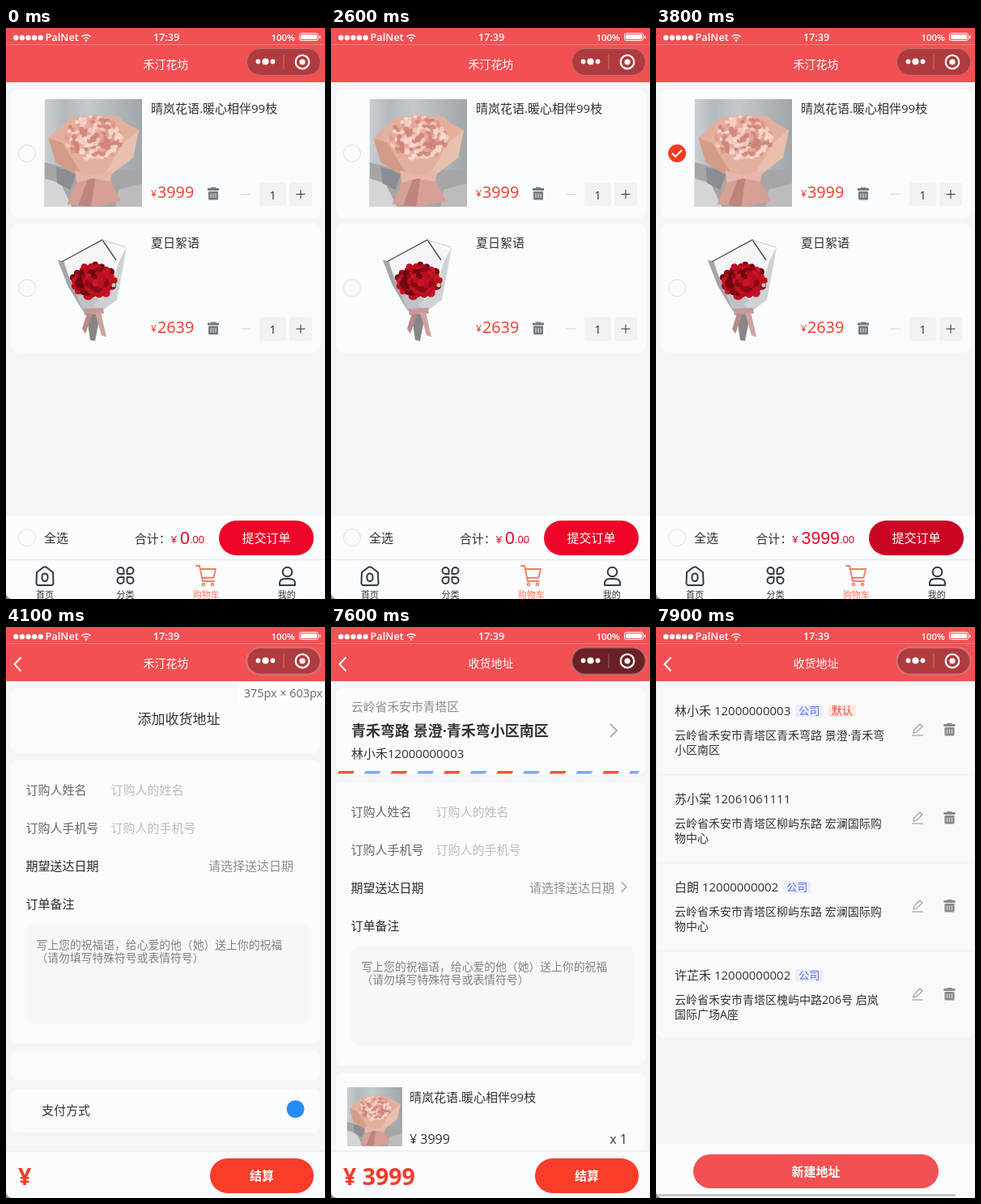
Recreate the animation shown at these times as an HTML page with a canvas. Size 394 by 706 pixels, loop 8 s.

```html
<!DOCTYPE html>
<html lang="zh">
<head>
<meta charset="utf-8">
<title>花坊购物车</title>
<style>
html, body { margin: 0; width: 100%; height: 100%; overflow: hidden; background: #f3f5f7; }
canvas { display: block; width: 394px; height: 706px; }
</style>
</head>
<body>
<canvas id="stage"></canvas>
<script>
const W = 394, H = 706, LOOP = 8000, STEP = 100;
const canvas = document.getElementById('stage');
const c = canvas.getContext('2d');
const dpr = window.devicePixelRatio || 1;
canvas.width = W * dpr;
canvas.height = H * dpr;

const FONT = '"Open Sans", "Noto Sans CJK SC", "Noto Sans CJK", "Noto Sans", sans-serif';
const ARIAL = '"Liberation Sans", "Noto Sans CJK SC", sans-serif';
const INK = '#333', RED = '#f33b28', CARD = '#fafbfd', PAGE = '#f3f5f7', HEAD = '#f25053';
const SHOP = '禾汀花坊', GOODS = '晴岚花语.暖心相伴99枝';
const REGION = '云岭省禾安市青塔区';

// ---- helpers ----
function text(s, x, cy, size, color = INK, o = {}) {
  c.font = `${o.weight || 400} ${size}px ${o.font || FONT}`;
  c.textAlign = o.align || 'left';
  c.fillStyle = color;
  c.fillText(s, x, cy + size * 0.37);
  return c.measureText(s).width;
}
function rect(x0, y0, x1, y1, color) {
  c.fillStyle = color;
  c.fillRect(x0, y0, x1 - x0, y1 - y0);
}
function box(x0, y0, x1, y1, r, color) {
  c.beginPath();
  c.roundRect(x0, y0, x1 - x0, y1 - y0, r);
  c.fillStyle = color;
  c.fill();
}
function disc(x, y, r, color) {
  c.beginPath();
  c.arc(x, y, r, 0, 7);
  c.fillStyle = color;
  c.fill();
}
function ring(x, y, r, color, w = 1) {
  c.beginPath();
  c.arc(x, y, r, 0, 7);
  c.strokeStyle = color;
  c.lineWidth = w;
  c.stroke();
}
function trace(points) {
  c.beginPath();
  points.forEach(([x, y]) => c.lineTo(x, y));
}
function poly(points, color) {
  trace(points);
  c.fillStyle = color;
  c.fill();
}
function line(points, color, w = 1, close) {
  trace(points);
  if (close) c.closePath();
  c.strokeStyle = color;
  c.lineWidth = w;
  c.stroke();
}
function pill(x0, y0, x1, y1, color, label, weight = 700) {
  box(x0, y0, x1, y1, (y1 - y0) / 2, color);
  text(label, (x0 + x1) / 2, (y0 + y1) / 2, 15, '#fff', { align: 'center', weight });
}
function seeded(seed) {
  return () => (seed = (seed * 16807) % 2147483647) / 2147483647;
}
function cluster(cx, cy, rx, ry, n, size, colors) {
  const rnd = seeded(77);
  for (let i = 0; i < n; i++) {
    const a = i * 2.4, d = Math.sqrt((n - i) / n);
    disc(cx + Math.cos(a) * rx * d, cy + Math.sin(a) * ry * d, size * (0.7 + rnd() * 0.5),
      colors[Math.floor(rnd() * colors.length)]);
  }
}

// ---- pictures ----
function pinkBouquet(x, y, w, h) {
  c.save();
  c.translate(x, y);
  c.scale(w / 121, h / 133);
  c.beginPath();
  c.rect(0, 0, 121, 133);
  c.clip();
  const g = c.createLinearGradient(0, 0, 121, 0);
  g.addColorStop(0, '#c9cfd2');
  g.addColorStop(0.2, '#b3babf');
  g.addColorStop(0.45, '#c3c9cc');
  g.addColorStop(0.7, '#b2b8bb');
  g.addColorStop(1, '#a0a6a9');
  rect(0, 0, 121, 133, g);
  poly([[0, 78], [30, 86], [121, 88], [121, 133], [0, 133]], '#a7a5a6');
  poly([[0, 98], [20, 104], [34, 133], [0, 133]], '#d3d5d8');
  poly([[14, 84], [40, 90], [32, 112], [16, 104]], '#8a8d92');
  poly([[92, 112], [121, 104], [121, 133], [88, 133]], '#bdbbbb');
  poly([[45, 90], [76, 90], [95, 126], [62, 133], [28, 130]], '#d6a097');
  poly([[54, 98], [63, 98], [58, 133], [42, 131]], '#bd857d');
  poly([[5, 48], [24, 30], [34, 22], [60, 20], [92, 21], [98, 28], [117, 38], [110, 72], [84, 92], [60, 96], [36, 92], [14, 78]], '#e2b09c');
  poly([[5, 48], [22, 54], [46, 92], [36, 92], [14, 78]], '#d39c88');
  poly([[117, 38], [98, 54], [74, 94], [84, 92], [110, 72]], '#e9c0ae');
  c.globalAlpha = 0.85;
  cluster(61, 47, 35, 26, 130, 3.6, ['#f5cfc4', '#e0988b', '#cf8278', '#f9ded4', '#e9aa9e']);
  c.globalAlpha = 1;
  poly([[38, 88], [60, 94], [84, 88], [82, 102], [60, 98], [40, 103]], '#e7b5aa');
  c.restore();
}
function redBouquet() {
  poly([[98, 345], [118, 345], [110, 387], [104, 386]], '#8a8587');
  poly([[70, 288], [119, 261], [146, 276], [140, 318], [116, 345], [92, 335]], '#f5f5f7');
  poly([[64, 287], [72, 289], [80, 316], [120, 338], [117, 351], [95, 350], [76, 318]], '#c0c2c6');
  poly([[64, 287], [70, 288], [90, 338], [95, 350], [76, 318]], '#a3a5a9');
  poly([[149, 271], [143, 304], [137, 336], [117, 351], [108, 342], [128, 326], [140, 288]], '#cfd1d5');
  line([[69, 289], [119, 262], [136, 287]], '#4d4e52', 1.4);
  line([[119, 262], [148, 271]], '#c5c6ca', 1);
  cluster(108, 312, 26, 20, 60, 5.2, ['#b80f1e', '#cc1626', '#8d0a16', '#be1122', '#6d0710']);
  disc(136, 306, 2.5, '#dcd9c9');
  disc(133, 318, 2.5, '#c8ccb8');
  poly([[95, 347], [120, 346], [121, 353], [97, 355]], '#c39a9a');
  poly([[110, 352], [117, 351], [124, 382], [118, 380]], '#cda3a1');
  poly([[100, 353], [107, 353], [98, 378], [94, 372]], '#b98a8b');
}

// ---- icons ----
function trash(x, y, color) {
  rect(x - 3, y - 8, x + 3, y - 6, color);
  rect(x - 7, y - 7, x + 7, y - 4, color);
  box(x - 6, y - 3, x + 6, y + 7.5, 1, color);
  for (const d of [-3, 0, 3]) rect(x + d - 0.5, y - 0.5, x + d + 0.5, y + 5, '#e3e5e6');
}
function pencil(x, y) {
  line([[x - 5, y + 4], [x - 4, y], [x + 3, y - 7], [x + 6, y - 4], [x - 1, y + 3]], '#999', 1.1, true);
  line([[x - 7, y + 7], [x + 7, y + 7]], '#999', 1.1);
}
function check(x, y, on) {
  if (!on) return ring(x, y, 10.5, '#dcdfe1');
  disc(x, y, 11, '#f43a22');
  line([[x - 6, y], [x - 2, y + 4], [x + 6, y - 4]], '#fff', 2.2);
}
function chevron(x, y, r, color, w) {
  line([[x - r, y - 2 * r], [x + r, y], [x - r, y + 2 * r]], color, w);
}

function tabBar() {
  const k = '#333a40', on = '#f67a60';
  rect(0, 657, W, H, '#fafbfe');
  rect(0, 657, W, 658, '#e3e5e8');
  c.lineJoin = c.lineCap = 'round';
  line([[46.5, 666.5], [49.5, 666.5], [58, 673], [58.5, 687], [57, 689], [39, 689], [37.5, 687], [38, 673]], k, 2, true);
  c.beginPath();
  c.roundRect(44.5, 674.5, 7, 9.5, 3.5);
  c.stroke();
  for (const [dx, dy] of [[-1, -1], [1, -1], [-1, 1], [1, 1]]) {
    const x = 147.5 + dx * 6, y = 677 + dy * 6, r = [4, 4, 4, 4];
    r[dy < 0 ? (dx < 0 ? 2 : 3) : (dx < 0 ? 1 : 0)] = 0.5;
    c.beginPath();
    c.roundRect(x - 4, y - 4, 8, 8, r);
    c.lineWidth = 2;
    c.stroke();
  }
  line([[235, 665], [239, 665], [243, 684], [257, 684]], on, 1.8);
  line([[240, 669], [259, 669], [256.5, 679.5], [242, 680]], on, 1.8);
  ring(244, 688, 1.6, on, 1.5);
  ring(255, 688, 1.6, on, 1.5);
  ring(347.5, 672.5, 5.8, k, 2);
  c.beginPath();
  c.moveTo(338, 689);
  c.bezierCurveTo(337, 680, 344, 681, 347.5, 681);
  c.bezierCurveTo(351, 681, 358, 680, 357, 689);
  c.closePath();
  c.stroke();
  c.lineJoin = 'miter';
  c.lineCap = 'butt';
  ['首页', '分类', '购物车', '我的'].forEach((s, i) =>
    text(s, 48 + i * 99.6, 701, 11, i === 2 ? on : INK, { align: 'center' }));
}

// ---- header ----
function header(title, back, dark) {
  const bold = { weight: 600 };
  rect(0, 0, W, 67, HEAD);
  rect(0, 20, W, 21, 'rgba(255,255,255,.25)');
  for (let i = 0; i < 5; i++) disc(12.3 + i * 7.6, 12, 3.2, '#fff');
  text('PalNet', 48.5, 11, 12.8, '#fff', bold);
  disc(99, 15.5, 1.2, '#fff');
  for (const r of [4, 7.5]) {
    c.beginPath();
    c.arc(99, 16, r, -Math.PI * 0.76, -Math.PI * 0.24);
    c.strokeStyle = '#fff';
    c.lineWidth = 1.5;
    c.stroke();
  }
  text('17:39', 198, 11.5, 12.8, '#fff', { align: 'center', ...bold });
  text('100%', 357, 11.5, 11.5, '#fff', { align: 'right', ...bold });
  c.strokeStyle = '#fff';
  c.lineWidth = 1;
  c.beginPath();
  c.roundRect(362.5, 6.5, 23, 9, 2);
  c.stroke();
  rect(364, 8, 384, 14, '#fff');
  rect(387, 9.5, 388.5, 13, '#fff');

  text(title, 197.5, 45, 14, '#fff', { align: 'center', weight: 500 });
  if (back) line([[18.5, 37.5], [10.5, 46], [18.5, 54.5]], '#fff', 2);

  box(297, 25, 389, 59, 17, dark ? '#6a2024' : '#b03b3f');
  c.beginPath();
  c.roundRect(297.5, 25.5, 91, 33, 16.5);
  c.strokeStyle = 'rgba(255,255,255,.28)';
  c.stroke();
  disc(311.5, 41.5, 2.9, '#fff');
  disc(320.5, 41.5, 4.1, '#fff');
  disc(329.5, 41.5, 2.9, '#fff');
  rect(342.5, 33, 343.5, 51, 'rgba(255,255,255,.3)');
  ring(366, 42, 8.3, '#fff', 2.2);
  disc(366, 42, 3.6, '#fff');
}

// ---- pages ----
function cartItem(dy, title, price, on) {
  box(6, 75 + dy, 389, 235 + dy, 9, CARD);
  check(26, 155 + dy, on);
  text(title, 179, 99 + dy, 15);
  text('¥', 179, 205 + dy, 12, RED);
  text(price, 187, 203 + dy, 19.8, RED);
  trash(256, 205 + dy, '#737b80');
  rect(290, 205 + dy, 302, 206 + dy, '#cfd2d4');
  box(313, 191 + dy, 346, 220 + dy, 2, '#f1f2f4');
  text('1', 329.5, 206 + dy, 15, INK, { align: 'center' });
  box(350, 191 + dy, 378, 220 + dy, 2, '#f1f2f4');
  rect(358.5, 205 + dy, 369.5, 206 + dy, INK);
  rect(363.5, 200 + dy, 364.5, 211 + dy, INK);
}
function cartPage(chosen, pressed) {
  rect(0, 67, W, H, PAGE);
  cartItem(0, GOODS, '3999', chosen);
  pinkBouquet(47.5, 88, 120.5, 133);
  cartItem(166.5, '夏日絮语', '2639', false);
  redBouquet();
  rect(0, 603, W, 657, '#fafcfe');
  check(26, 630, false);
  text('全选', 47, 630, 15);
  const num = chosen ? '3999' : '0', crimson = '#e8082c', o = { font: ARIAL, align: 'right' };
  let x = 245;
  x -= text('.00', x, 632, 13, crimson, o);
  x -= text(num, x, 630, 21.3, crimson, o) + 4;
  x -= text('¥', x, 632, 13, crimson, o);
  text('合计：', x, 631, 15, INK, { align: 'right' });
  pill(263, 609, 380, 652, pressed ? '#cc0424' : '#ee0428', '提交订单', 500);
  tabBar();
}

function orderPage(t) {
  const arrows = t >= 4200, goods = t >= 4300, address = t >= 4400, dy = address ? 27 : 0;
  rect(0, 67, W, H, PAGE);
  if (address) {
    box(6, 76, 388, 183, 8, CARD);
    text(REGION, 25, 99, 14.8, '#8c8c8c');
    text('青禾弯路 景澄·青禾弯小区南区', 25, 128, 18, INK, { weight: 700 });
    text('林小禾12000000003', 25, 156, 15);
    chevron(349, 128, 4, '#aaa', 1.8);
    for (let i = 0; i < 12; i++) {
      const x = 8 + i * 32.7, e = Math.min(x + 21, 381);
      poly([[x + 2, 178], [e, 178], [e - 2, 181.5], [x, 181.5]], i % 2 ? '#7fa8f4' : '#f2562b');
    }
  } else {
    box(6, 76, 388, 156, 8, CARD);
    text('添加收货地址', 213.5, 114, 17, INK, { align: 'center' });
  }

  box(6, 165 + dy, 388, 515 + dy, 8, CARD);
  text('订购人姓名', 24.5, 201 + dy, 15, '#666');
  text('订购人的姓名', 129.5, 201 + dy, 15, '#bcbcbc');
  text('订购人手机号', 24.5, 248 + dy, 15, '#666');
  text('订购人的手机号', 129.5, 248 + dy, 15, '#bcbcbc');
  text('期望送达日期', 24.5, 295 + dy, 15, '#2a2a2a');
  text('请选择送达日期', arrows ? 350 : 355, 295 + dy, 15, '#8e8e8e', { align: 'right' });
  if (arrows) chevron(362, 294.5 + dy, 3, '#999', 1.3);
  text('订单备注', 24.5, 342 + dy, 15, '#2a2a2a');
  box(25, 367 + dy, 375, 491 + dy, 11, '#f6f7f9');
  text('写上您的祝福语，给心爱的他（她）送上你的祝福', 37.5, 393 + dy, 13.8, '#808080');
  text('（请勿填写特殊符号或表情符号）', 37.5, 409 + dy, 13.8, '#808080');

  if (goods) {
    box(6, 524 + dy, 388, 720, 8, CARD);
    pinkBouquet(20, 542 + dy, 68, 73);
    text(GOODS, 97, 554 + dy, 15);
    text('¥ 3999', 97, 606 + dy, 16);
    text('x 1', 366, 606 + dy, 16, INK, { align: 'right' });
  } else {
    box(6, 524, 388, 560, 8, CARD);
    box(6, 571, 388, 625, 8, CARD);
    text('支付方式', 44, 597, 15);
    disc(357.5, 596, 10.8, '#258cf5');
  }
  rect(0, 648, W, H, '#f9fafd');
  rect(0, 647.5, W, 648.5, '#e6e8eb');
  text(goods ? '¥ 3999' : '¥', 15, 679, 28.5, RED, { weight: 700 });
  pill(252, 657, 380, 700, '#f93d29', '结算');

  if (t >= 4100 && t < 4800) {
    rect(286, 68, W, 94, 'rgba(255,255,255,.85)');
    text('375px × 603px', 391, 81.5, 14.4, '#666', { align: 'right' });
  }
}

const PEOPLE = [
  ['林小禾 12000000003', '青禾弯路 景澄·青禾弯', '小区南区', '公司', '默认'],
  ['苏小棠 12061061111', '柳屿东路 宏澜国际购', '物中心'],
  ['白朗 12000000002', '柳屿东路 宏澜国际购', '物中心', '公司'],
  ['许芷禾 12000000002', '槐屿中路206号 启岚', '国际广场A座', '公司']
];
function tag(label, x, cy) {
  const red = label === '默认';
  box(x, cy - 7.5, x + 34, cy + 7.5, 2, red ? '#fde7e4' : '#e9edfd');
  text(label, x + 17, cy, 13, red ? '#f0473a' : '#5b69ee', { align: 'center' });
}
function addressPage(filled) {
  rect(0, 67, W, H, '#f2f4f7');
  if (filled) {
    box(2, 72, 392, 509, 8, '#f9f9fa');
    PEOPLE.forEach(([who, road, rest, ...tags], i) => {
      const y = i * 109;
      const end = 23 + text(who, 23, 103.5 + y, 15);
      tags.forEach((s, k) => tag(s, end + 6 + k * 40.5, 103.5 + y));
      text(REGION + road, 23, 133.5 + y, 14);
      text(rest, 23, 152 + y, 14);
      pencil(323, 127 + y);
      trash(362.5, 127 + y, '#8a8a8a');
      if (i < 3) rect(2, 182 + y, 392, 183 + y, '#eff0f2');
    });
  }
  rect(0, 639, W, H, '#fafbfd');
  pill(46, 652, 349, 694, '#f35053', '新建地址');
  rect(0, 701, 370, 704, '#c8c8cb');
}

// ---- overlays ----
function toast() {
  box(106, 331, 288, 376, 5, 'rgba(17,17,17,.7)');
  text('请选择要购买的商品', 197, 353.5, 15, '#fff', { align: 'center' });
}
function loading(t) {
  box(133, 242, 261, 376, 5, 'rgba(17,17,17,.7)');
  c.save();
  c.translate(197, 297);
  c.rotate(t / 1000 * Math.PI * 2);
  c.lineCap = 'round';
  for (let i = 0; i < 12; i++) {
    c.rotate(Math.PI / 6);
    line([[0, -10], [0, -18]], `rgba(255,255,255,${0.2 + i * 0.06})`, 3);
  }
  c.restore();
  text('加载中', 197, 348, 15, '#fff', { align: 'center' });
}

function slid(x, page) {
  c.save();
  c.translate(x, 0);
  page();
  c.restore();
}

function draw(t) {
  c.setTransform(dpr, 0, 0, dpr, 0, 0);
  if (t < 4100) {
    cartPage(t >= 2900, t === 1200 || t === 3800);
    if (t >= 1300 && t < 2600) toast();
    if (t >= 2800 && t < 3000) loading(t);
    if (t >= 4000) slid(W * 0.4, () => orderPage(t));
  } else if (t < 7800) {
    orderPage(t);
    if (t >= 7700) slid(W * 0.4, () => addressPage(false));
  } else {
    addressPage(t >= 7900);
  }
  header(t >= 7600 ? '收货地址' : SHOP, t >= 3900, t === 3900 || t === 7600);
  // rounded window corner
  c.beginPath();
  c.moveTo(0, 698);
  c.arc(8, 698, 8, Math.PI, Math.PI / 2, true);
  c.lineTo(0, 706);
  c.fillStyle = '#8b8d90';
  c.fill();
}

const start = performance.now();
function tick() {
  const t = (performance.now() - start) % LOOP;
  draw(Math.floor(t / STEP) * STEP);
  requestAnimationFrame(tick);
}
tick();
</script>
</body>
</html>
```
